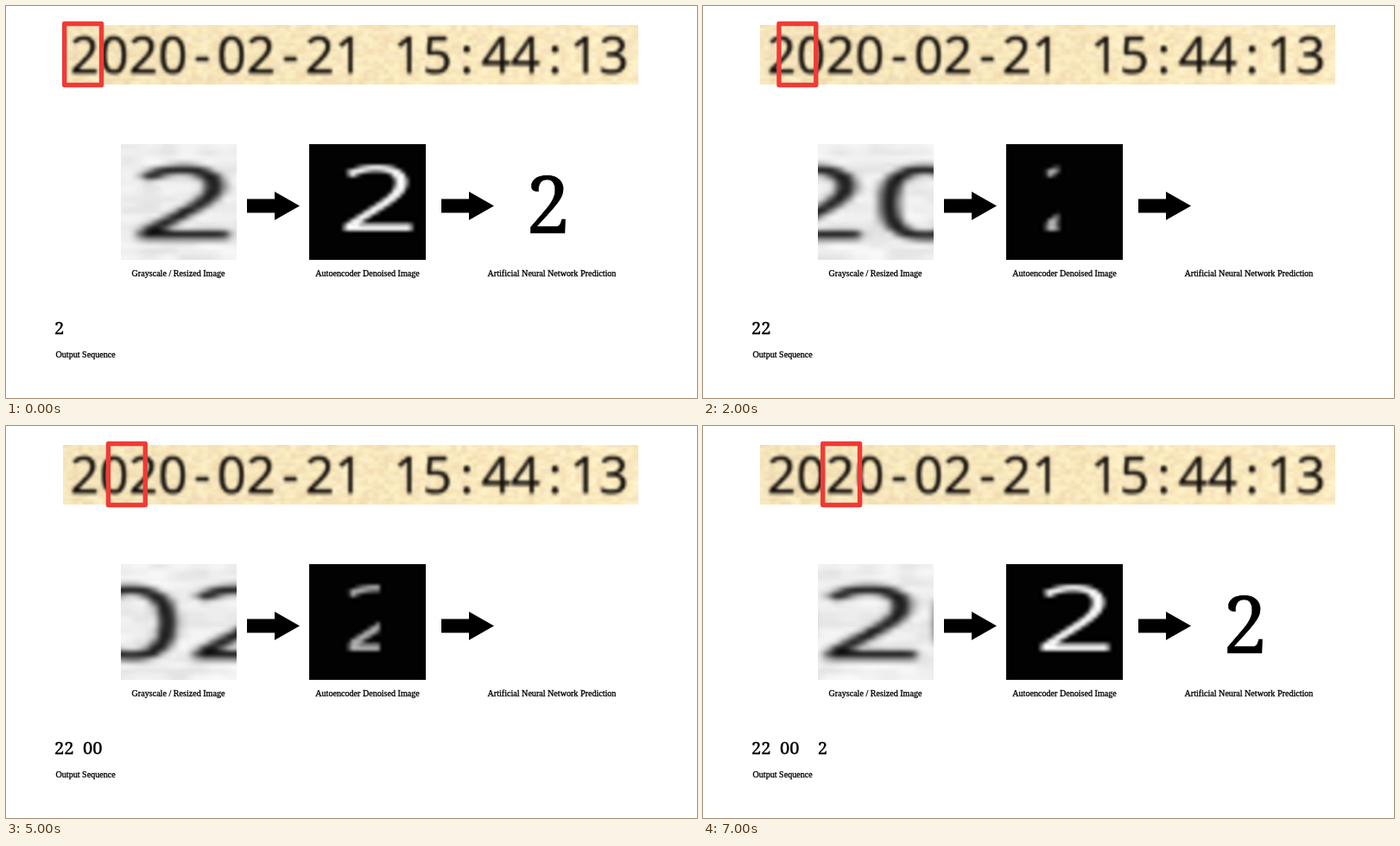
An HTML page with a canvas for the animation above (8 s loop, 800 by 454 pixels).

```html
<!DOCTYPE html>
<html lang="en">
<head>
<meta charset="utf-8">
<title>Digit recognition pipeline</title>
<style>
html, body { margin: 0; width: 100%; height: 100%; overflow: hidden; background: #fff; }
canvas, svg { position: absolute; left: 0; top: 0; width: 800px; height: 454px; }
.label { font: 10.1px "Liberation Serif", serif; stroke: #000; stroke-width: .3px; }
.mid { text-anchor: middle; }
.digit { font: 92px "Noto Serif", serif; text-anchor: middle; stroke: #000; stroke-width: .6px; }
.out { font: 20.2px "Noto Serif", serif; white-space: pre; stroke: #000; stroke-width: .35px; }
</style>
</head>
<body>
<canvas id="stage" width="800" height="454"></canvas>
<svg viewBox="0 0 800 454">
  <path id="arrow" d="M279 223.5h32V215l29 16.5-29 16.5v-8.5h-32z"/>
  <use href="#arrow" x="225"/>
  <text class="label mid" x="199.5" y="313">Grayscale / Resized Image</text>
  <text class="label mid" x="418.5" y="313">Autoencoder Denoised Image</text>
  <text class="label mid" x="632" y="313">Artificial Neural Network Prediction</text>
  <text class="label" x="57.5" y="407">Output Sequence</text>
  <text class="digit" id="digit" x="627.5" y="263"></text>
  <text class="out" id="out" x="56" y="380"></text>
  <rect id="frame" y="20.5" width="42.8" height="71" fill="none" stroke="#f03a36" stroke-width="5.4" stroke-linejoin="round"/>
</svg>
<script>
const STEP = 1000;
const SLIDE = 10.15;            // frame travel per step
const STAMP = '2020-02-21 15:44:13';
const PREDICTED = '22 00  2';   // a space means no digit was found
const STRIP = { x: 65.5, y: 22, w: 666.5, h: 68.5 };
const TILE = 134;

const $ = id => document.getElementById(id);
const ctx = $('stage').getContext('2d');

let seed = 7;
const rand = () => (seed = seed * 16807 % 2147483647) / 2147483647;

function layer(w, h) {
  const g = Object.assign(document.createElement('canvas'), { width: w, height: h }).getContext('2d');
  g.font = '59px "Open Sans", sans-serif';
  g.textAlign = 'center';
  g.imageSmoothingQuality = 'high';
  return g;
}

// The camera's time stamp, reduced to a coarse pixel grid.
function photo() {
  const full = layer(667, 69);
  for (let y = 0; y < 69; y += 3.4)
    for (let x = 0; x < 667; x += 6) {
      const n = (rand() - .5) * 26, warm = rand() * 16, light = x / 667 * 6;
      full.fillStyle = `rgb(${245 + n * .5 + light},${228 + n + light},${194 + n - warm + light})`;
      full.fillRect(x, y, 7, 4);
    }
  full.fillStyle = full.strokeStyle = '#15100c';
  full.lineWidth = .7;
  [...STAMP].forEach((ch, i) => {
    const x = 26 + 34 * i;
    full.fillText(ch, x, 55.5);
    full.strokeText(ch, x, 55.5);
  });
  const coarse = layer(254, 20);
  coarse.drawImage(full.canvas, 0, 0, 254, 20);
  return coarse.canvas;
}

// The clean digit; without one, only a slit of a "2" comes through.
function denoised(i) {
  const g = layer(28, 28), digit = PREDICTED[i].trim(), unit = 28 / TILE;
  g.fillStyle = '#020202';
  g.fillRect(0, 0, 28, 28);
  g.scale(unit, unit);
  if (!digit) {
    g.beginPath();
    g.rect(46, 0, 7 * i, TILE);
    g.clip();
  }
  g.translate(digit === '0' ? 67.5 : 80, 100);
  g.scale(2.8, 1.78);
  g.fillStyle = digit ? '#f2f2f2' : '#a8a8a8';
  g.fillText(digit || '2', 0, 0);
  return g.canvas;
}

const strip = photo();
ctx.imageSmoothingQuality = 'high';

function draw(i) {
  const { x, y, w, h } = STRIP, grid = strip.width / w;
  ctx.clearRect(0, 0, 800, 454);
  ctx.drawImage(strip, x, y, w, h);

  ctx.filter = 'grayscale(1) brightness(1.04)';
  ctx.drawImage(strip, (5.8 + SLIDE * i) * grid, 0, 36 * grid, strip.height, 133, 160, TILE, TILE);
  ctx.filter = 'none';
  ctx.drawImage(denoised(i), 351, 160, TILE + 1, TILE);

  $('frame').setAttribute('x', 67.7 + SLIDE * i);
  $('digit').textContent = PREDICTED[i].trim();
  $('out').textContent = PREDICTED.slice(0, i + 1).replace(/ /g, '  ');
}

let shown = -1;
function tick(now) {
  const i = Math.floor(now / STEP) % PREDICTED.length;
  if (i !== shown) draw(shown = i);
  requestAnimationFrame(tick);
}
tick(performance.now());
</script>
</body>
</html>
```
